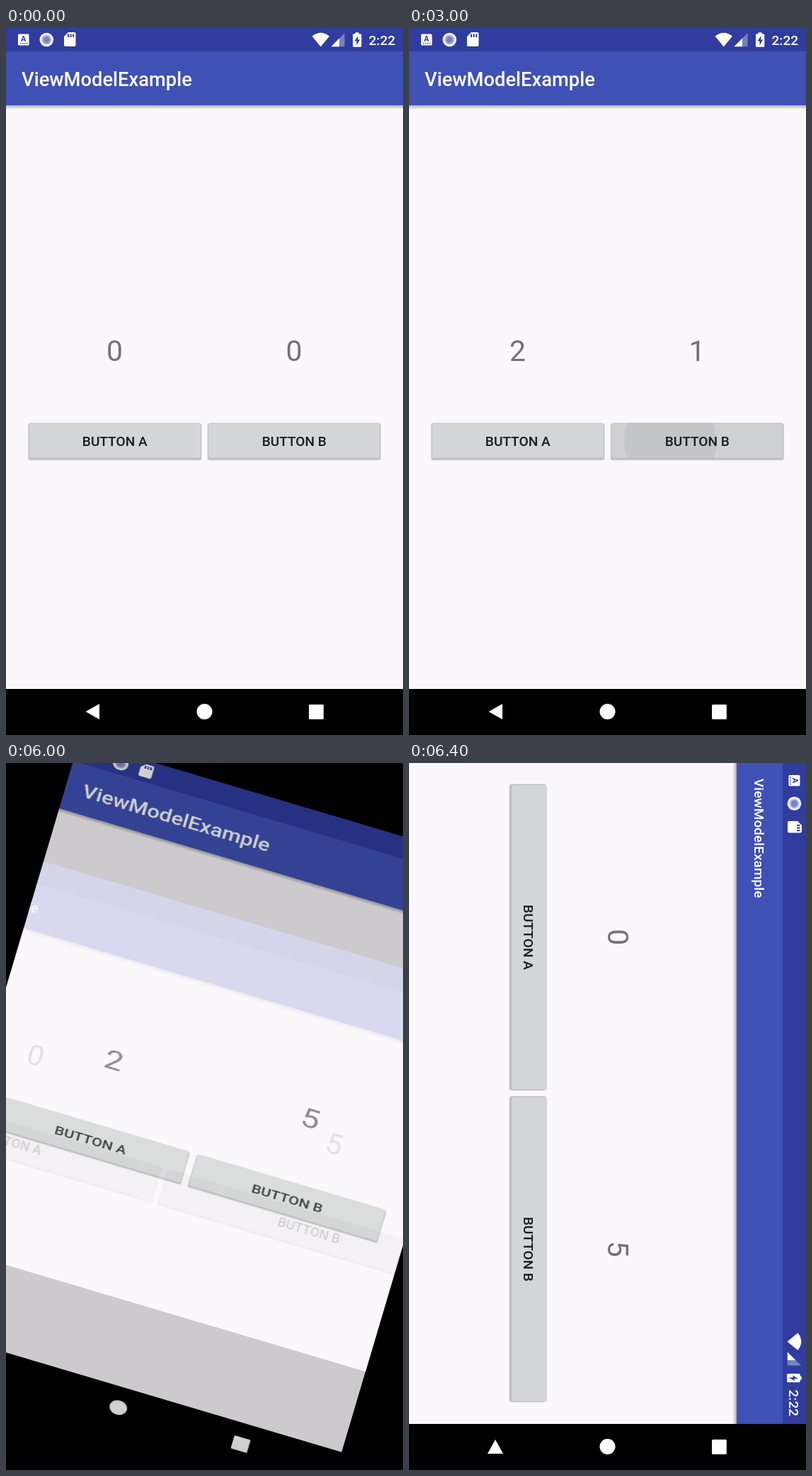
Write an HTML page with a canvas that moves like this. It is 561 px wide and 998 px high and loops after 8 s.

```html
<!DOCTYPE html>
<html lang="en">
<head>
<meta charset="utf-8">
<title>ViewModelExample</title>
<style>
  html, body { margin: 0; width: 100%; height: 100%; overflow: hidden; background: #000; }
  canvas { display: block; }
</style>
</head>
<body>
<canvas id="stage"></canvas>
<script>
const W = 561, H = 998, BAR = 933, LOOP = 8000, STEP = 100, TURN_AT = 6000;
const WHITE = '#fff', STATUS = '#303c9e', PAPER = '#faf8fc';

// Each tap: time, end of its ripple, horizontal touch point
const TAPS_A = [[2100, 2300, 150], [2300, 2600, 150]];
const TAPS_B = [[2900, 3100, 369.5], [3100, 3300, 369.5], [3300, 3300, 369.5],
                [3500, 3700, 369.5], [3700, 3800, 369.5]];

const PORTRAIT = { width: W, appBottom: 109, titleY: 72, titleSize: 27.3,
  digitY: 455.7, buttonY: 557, buttons: [[32.5, 242.5], [286, 242.5]] };
const LANDSCAPE = { width: BAR, appBottom: 98, titleY: 66, titleSize: 19.1,
  digitY: 265, buttonY: 366, buttons: [[31, 430], [471.5, 429.5]] };

function makeCanvas(el = document.createElement('canvas')) {
  el.width = W;
  el.height = H;
  return el.getContext('2d');
}

const stage = makeCanvas(document.getElementById('stage'));
const before = makeCanvas(), after = makeCanvas();

function box(g, x, y, w, h, color, r = 0) {
  g.fillStyle = color;
  g.beginPath();
  g.roundRect(x, y, w, h, r);
  g.fill();
}

function disc(g, x, y, r, color) {
  g.fillStyle = color;
  g.beginPath();
  g.arc(x, y, r, 0, 2 * Math.PI);
  g.fill();
}

function shape(g, path, color) {
  g.fillStyle = color;
  g.fill(new Path2D(path));
}

// Text centred vertically on its capital height
function label(g, text, x, cy, size, color, weight = 500, align = 'center') {
  g.font = `${weight} ${size}px Roboto, sans-serif`;
  g.textAlign = align;
  g.fillStyle = color;
  g.fillText(text, x, cy + size * 0.355);
}

function statusBar(g, width) {
  box(g, 0, 0, width, 33, STATUS);
  box(g, 17, 8.5, 15.5, 16, WHITE, 1.5);
  label(g, 'A', 24.7, 15, 11, STATUS, 700);
  for (let x = 20; x < 30; x += 3) box(g, x, 21, 1.5, 1.5, STATUS);
  disc(g, 57.3, 16.5, 9.8, '#eef0fa');
  disc(g, 57.3, 16.5, 6.6, '#a9b0da');
  disc(g, 57.3, 16.5, 4.5, '#7a84bf');
  shape(g, 'M88 6H96.5Q98.5 6 98.5 8V24Q98.5 26 96.5 26H84Q82 26 82 24V12Z', WHITE);
  for (let x = 87; x < 97; x += 3.6) box(g, x, 8.5, 2, 4.5, STATUS);

  g.save();
  g.translate(width - W, 0);
  shape(g, 'M432.5 11.5Q444.7 2 457 11.5L444.7 26.5Z', WHITE);
  shape(g, 'M459.5 26.2L478.5 7V26.2Z', 'rgba(255,255,255,.35)');
  shape(g, 'M459.5 26.2L471 14.6V26.2Z', WHITE);
  box(g, 490, 8.3, 12.3, 18.5, WHITE, 1.5);
  box(g, 493.6, 6.3, 5, 3, WHITE);
  shape(g, 'M497.3 11L492.5 18.5H495.5V24.5L500 16.5H497.3Z', STATUS);
  label(g, '2:22', 531.3, 17, 19.1, WHITE);
  g.restore();
}

function navBar(g, landscape) {
  box(g, 0, BAR, W, H - BAR, '#000');
  shape(g, landscape ? 'M122 955L133 975H111Z' : 'M112.5 965L132 954V976Z', WHITE);
  disc(g, 280.5, 965, 11, WHITE);
  box(g, 428, 955, 20.8, 20.8, WHITE, 1.5);
}

function button(g, [x, width], y, text, ripple) {
  const height = 50.3;
  for (let i = 1; i <= 3; i++) box(g, x - i / 2, y + 1, width + i, height + i - 0.5, 'rgba(0,0,0,.1)', 3);
  box(g, x, y, width, height, '#d4d5d6', 2.5);
  if (ripple) {
    g.save();
    g.beginPath();
    g.roundRect(x, y, width, height, 2.5);
    g.clip();
    box(g, x, y, width, height, `rgba(0,0,0,${ripple.veil})`);
    disc(g, ripple.x, y + 26, ripple.radius, `rgba(0,0,0,${ripple.alpha})`);
    g.restore();
  }
  label(g, text, x + width / 2, y + 26, 19.1, '#1a1a1b');
}

function screen(g, layout, values, ripples) {
  const landscape = layout === LANDSCAPE;
  const { width, appBottom } = layout;
  g.setTransform(1, 0, 0, 1, 0, 0);
  box(g, 0, 0, W, H, PAPER);
  g.save();
  if (landscape) g.transform(0, 1, -1, 0, W, 0);
  const shade = g.createLinearGradient(0, appBottom, 0, appBottom + 6);
  shade.addColorStop(0, 'rgba(0,0,0,.3)');
  shade.addColorStop(1, 'rgba(0,0,0,0)');
  box(g, 0, appBottom, width, 6, shade);
  box(g, 0, 33, width, appBottom - 33, '#3f51b5');
  statusBar(g, width);
  label(g, 'ViewModelExample', 22, layout.titleY, layout.titleSize, WHITE, 500, 'left');
  layout.buttons.forEach((span, i) => {
    label(g, values[i], span[0] + span[1] / 2 - 0.3, layout.digitY, 41, '#737275', 400);
    button(g, span, layout.buttonY, 'BUTTON ' + 'AB'[i], ripples[i]);
  });
  g.restore();
  navBar(g, landscape);
}

const countAt = (taps, t) => taps.filter(tap => tap[0] <= t).length;

function rippleAt(taps, t) {
  const tap = taps.find(([start, end]) => t >= start && t < end);
  if (!tap) return null;
  const age = (t - tap[0]) / STEP;
  const fade = age > 1 ? 0.5 : 1;
  return { x: tap[2], radius: 25 + 40.5 * age, veil: 0.025 * fade, alpha: 0.05 * fade };
}

// cubic-bezier(.4, 0, .2, 1)
function fastOutSlowIn(x) {
  if (x <= 0 || x >= 1) return x <= 0 ? 0 : 1;
  let low = 0, high = 1, s;
  for (let i = 0; i < 24; i++) {
    s = (low + high) / 2;
    const r = 1 - s;
    if (1.2 * r * r * s + 0.6 * r * s * s + s ** 3 < x) low = s; else high = s;
  }
  return s * s * (3 - 2 * s);
}

function turn(progress) {
  const angle = progress * Math.PI / 2;
  const stretch = 1 + (H / W - 1) * progress, squash = 1 + (W / H - 1) * progress;
  box(stage, 0, 0, W, H, '#000');
  stage.save();
  stage.translate(W / 2, H / 2);
  stage.rotate(angle);
  stage.beginPath();
  stage.rect(-W / 2 * stretch, -H / 2 * squash, W * stretch, H * squash);
  stage.clip();
  stage.save();
  stage.rotate(-Math.PI / 2);
  stage.drawImage(after.canvas, -W / 2, -H / 2);
  stage.restore();
  stage.globalAlpha = 1 - progress;
  stage.scale(stretch, squash);
  stage.drawImage(before.canvas, -W / 2, -H / 2);
  stage.restore();
}

function draw(time) {
  const t = Math.floor(time % LOOP / STEP) * STEP;
  const a = countAt(TAPS_A, t), b = countAt(TAPS_B, t);
  const progress = t < TURN_AT ? 0 : fastOutSlowIn(0.2263 + 0.2634 * (t - TURN_AT) / STEP);
  if (progress === 0) {
    screen(stage, PORTRAIT, [a, b], [rippleAt(TAPS_A, t), rippleAt(TAPS_B, t)]);
  } else if (progress === 1) {
    screen(stage, LANDSCAPE, [0, b], []);
  } else {
    screen(before, PORTRAIT, [a, b], []);
    screen(after, LANDSCAPE, [0, b], []);
    turn(progress);
  }
}

const start = performance.now();
function tick() {
  draw(performance.now() - start);
  requestAnimationFrame(tick);
}
tick();
</script>
</body>
</html>
```
